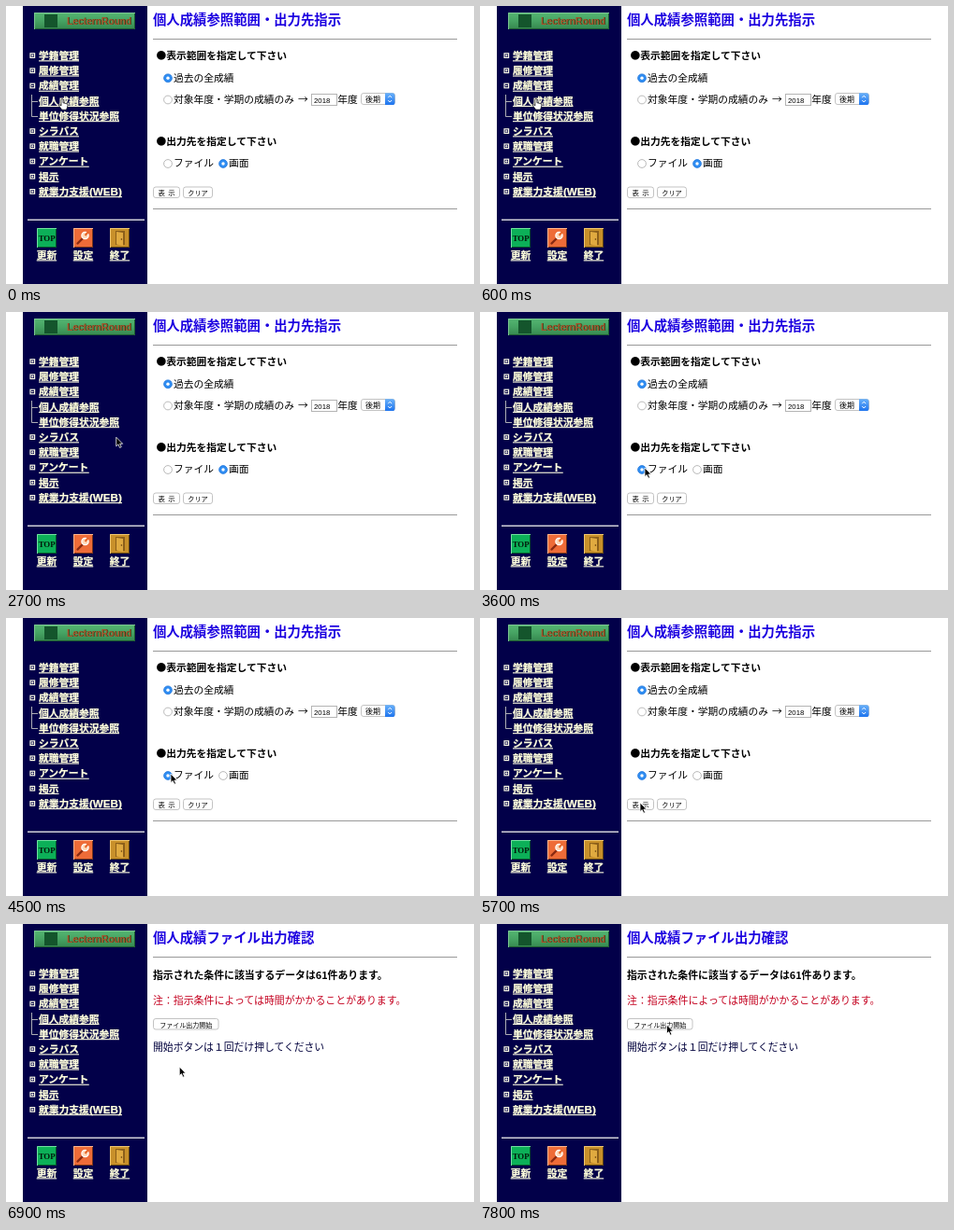
An HTML page that plays this animation: 500 by 298 pixels, repeating every 8 s.

```html
<!DOCTYPE html>
<html lang="ja">
<head>
<meta charset="utf-8">
<title>成績参照</title>
<style>
html, body { margin: 0; width: 100%; height: 100%; overflow: hidden; background: #fff; }
svg { display: block; width: 500px; height: 298px; }
text { font: 10.75px "Noto Sans CJK JP", "Noto Sans CJK", sans-serif; white-space: pre; }
.title { font-size: 14.36px; font-weight: 700; fill: #1c00e0; }
.bold { font-weight: 700; }
.link { font-weight: 700; fill: #ffffe4; stroke: #ffffc8; stroke-width: .25; }
.latin { font-family: "Liberation Sans", Arial, sans-serif; }
.rule { fill: #999; }
.box { fill: #fff; stroke: #b4b4b4; }
.ring { fill: var(--ring, #fff); stroke: var(--edge, #a9a9a9); }
.dot { fill: #fff; }
.on { --ring: #2f8df2; --edge: #2579dc; }
</style>
</head>
<body>
<svg viewBox="0 0 500 298">
  <defs>
    <linearGradient id="leaf" x2="0" y2="1">
      <stop offset="0" stop-color="#55b672"/>
      <stop offset=".5" stop-color="#46a363"/>
      <stop offset="1" stop-color="#36884f"/>
    </linearGradient>
    <linearGradient id="blue" x2="0" y2="1">
      <stop offset="0" stop-color="#69b1fa"/>
      <stop offset="1" stop-color="#1e74ee"/>
    </linearGradient>
    <g id="radio">
      <circle class="ring" r="4.4" stroke-width=".8"/>
      <circle class="dot" r="1.7"/>
    </g>
  </defs>

  <rect x="18" width="133" height="298" fill="#020049"/>
  <rect x="30" y="7" width="108" height="18" fill="url(#leaf)"/>
  <path d="M30.5 25V7.5H138" fill="none" stroke="#7cc692"/>
  <path d="M31 24.5H137.5V8" fill="none" stroke="#1d5a31"/>
  <rect x="41" y="9" width="14" height="14" fill="#14552c"/>
  <text class="latin" x="65.8" y="20.3" style="font-size:10.2px;font-weight:700" fill="#274a20">LecternRound</text>
  <text class="latin" x="65" y="19.5" style="font-size:10.2px;font-weight:700" fill="#a5532b">LecternRound</text>
  <g id="menu"></g>
  <path d="M27.5 95V118.5H34M27.5 102.5H34" fill="none" stroke="#d8d8d0" stroke-width=".8"/>

  <rect x="23" y="228.5" width="125" height="1.5" fill="#d0d0d8"/>
  <g id="tiles"></g>
  <text x="43.6" y="251.8" text-anchor="middle" style="font:700 8.8px 'Liberation Serif',serif" fill="#02180a">TOP</text>
  <path d="M76.5 254.5L82 249" stroke="#8a2a12" stroke-width="2.4" stroke-linecap="round"/>
  <circle cx="84.5" cy="246" r="3.6" fill="#ffd9b8" stroke="#fff" stroke-width="1.3"/>
  <path d="M84.5 246L88 242" stroke="#e8682c" stroke-width="2"/>
  <path d="M117 241H127V256H117Z" fill="#8c5f1a"/>
  <path d="M118 242L125 243V257L118 255.5Z" fill="#e0aa40"/>
  <circle cx="123.4" cy="250" r=".8" fill="#5a3508"/>

  <rect class="rule" x="157" y="35" width="325" height="1"/>

  <g id="form">
    <text class="title" x="157" y="20">個人成績参照範囲・出力先指示</text>
    <text class="bold" x="160.5" y="57">●表示範囲を指定して下さい</text>
    <use class="on" href="#radio" x="173" y="77.3"/>
    <text x="179" y="80.5">過去の全成績</text>
    <use href="#radio" x="173" y="100.5"/>
    <text x="179" y="103.5">対象年度・学期の成績のみ</text>
    <text x="312" y="103.5">→</text>
    <rect class="box" x="326.5" y="94.5" width="27" height="12"/>
    <text class="latin" x="329" y="103.5" style="font-size:7.8px">2018</text>
    <text x="354.3" y="103.5">年度</text>
    <rect class="box" x="379.5" y="93.5" width="36" height="12" rx="2.5" stroke-width=".8"/>
    <path d="M405 93.2h7.8q2.6 0 2.6 2.6v7.6q0 2.6-2.6 2.6h-7.8z" fill="url(#blue)"/>
    <path d="M408.3 98.2l1.9-2 1.9 2M408.3 101l1.9 2 1.9-2" fill="none" stroke="#fff"/>
    <text x="384" y="102.7" style="font-size:8px">後期</text>
    <text class="bold" x="160.5" y="148.7">●出力先を指定して下さい</text>
    <use id="file" href="#radio" x="173" y="169"/>
    <text x="179" y="172">ファイル</text>
    <use id="screen" href="#radio" x="232" y="169"/>
    <text x="238" y="172">画面</text>
    <rect class="box" x="157.5" y="194" width="28" height="11.5" rx="2.5" stroke-width=".8"/>
    <text x="171.5" y="202.6" text-anchor="middle" style="font-size:7.4px">表&#160; 示</text>
    <rect class="box" x="189.5" y="194" width="31" height="11.5" rx="2.5" stroke-width=".8"/>
    <text x="205" y="202.6" text-anchor="middle" style="font-size:7.2px">クリア</text>
    <rect class="rule" x="157" y="217" width="325" height="1"/>
  </g>

  <g id="confirm" visibility="hidden">
    <text class="title" x="157" y="20">個人成績ファイル出力確認</text>
    <text class="bold" x="157" y="59.3" style="font-size:10.87px">指示された条件に該当するデータは61件あります。</text>
    <text x="157" y="86.3" fill="#c4001f" style="font-size:10.92px">注：指示条件によっては時間がかかることがあります。</text>
    <rect class="box" x="157.5" y="101.5" width="69.5" height="11.5" rx="2.5" stroke-width=".8"/>
    <text x="192.2" y="110.6" text-anchor="middle" style="font-size:7px">ファイル出力開始</text>
    <text x="157" y="136.2" fill="#00003c" style="font-size:10.82px">開始ボタンは１回だけ押してください</text>
  </g>

  <g id="cursor">
    <path id="hand" d="M-1-2q1.2-1.2 2 .2v3.6l4 1q1 .4.9 1.5l-.7 3.2-.8 1.7h-4.6l-3.2-4.2q-.2-1.5 1.2-1l1.2.9z" fill="#fff" stroke="#111" stroke-width=".7"/>
    <path id="arrow" d="M0 0V9.6L2.2 7.6 3.8 11.2 5.5 10.4 3.9 7H6.9Z" fill="#000" stroke="#fff" stroke-width=".8"/>
  </g>
</svg>
<script>
const $ = id => document.getElementById(id);
const LOOP = 8000, HOLD = 300;
const link = (x, y, s, w) =>
  `<text class="link" x="${x}" y="${y}">${s}</text>` +
  `<rect x="${x}" y="${y + 1.3}" width="${w}" height="1.1" fill="#ffffe0"/>`;

const items = ['学籍管理', '履修管理', '成績管理', '個人成績参照', '単位修得状況参照',
  'シラバス', '就職管理', 'アンケート', '掲示', '就業力支援'];
$('menu').innerHTML = items.map((s, i) => {
  const y = 53 + i * 16.2, last = i === 9;
  const child = i === 3 || i === 4;
  const mark = child ? '' :
    `<rect x="26" y="${y - 2.2}" width="4.6" height="4.6" fill="#020049" stroke="#fbfbe6" stroke-width="1.2"/>` +
    `<path d="M27 ${y + .1}h2.6${i === 2 ? '' : 'm-1.3-1.3v2.6'}" stroke="#fbfbe6" stroke-width=".9"/>`;
  const tail = last ? `<text class="link latin" x="89" y="${y + 4}" style="font-size:11.6px">(WEB)</text>` : '';
  return mark + link(35, y + 4, s, last ? 89 : s.length * 10.75) + tail;
}).join('');

const tiles = [['更新', '#0cb058', '#72dfa0'], ['設定', '#ee6c38', '#ffb58d'], ['終了', '#c8902a', '#efc56e']];
$('tiles').innerHTML = tiles.map(([s, fill, edge], i) => {
  const x = 33 + i * 39;
  return `<rect x="${x}" y="238" width="21" height="21" fill="${fill}"/>` +
    `<path d="M${x + .5} 259V238.5H${x + 21}" fill="none" stroke="${edge}"/>` +
    `<path d="M${x + 1} 258.5H${x + 20.5}V239" fill="none" stroke="#0008"/>` +
    link(x - .3, 271, s, 21.5);
}).join('');

// Cursor stops: time, x, y
const stops = [[0, 60, 102], [2100, 59.5, 101.5], [3300, 176, 167], [4500, 176, 167],
  [5400, 171, 198], [6300, 171, 198], [7500, 199.5, 108], [8000, 199.5, 108]];
const ease = p => p * p * (3 - 2 * p);

function cursorAt(t) {
  const i = stops.findIndex(s => s[0] > t);
  const [t0, x0, y0] = stops[i - 1], [t1, x1, y1] = stops[i];
  const p = ease((t - t0) / (t1 - t0));
  return [x0 + (x1 - x0) * p, y0 + (y1 - y0) * p];
}

const show = (id, on) => $(id).setAttribute('visibility', on ? 'visible' : 'hidden');

function draw(now) {
  const t = Math.floor(now % LOOP / HOLD) * HOLD;
  const [x, y] = cursorAt(t);
  const overLink = t <= 2100;
  $('cursor').setAttribute('transform', `translate(${x} ${y})`);
  show('hand', overLink);
  show('arrow', !overLink);
  const picked = t >= 3600;
  $('file').classList.toggle('on', picked);
  $('screen').classList.toggle('on', !picked);
  show('form', t < 6000);
  show('confirm', t >= 6000);
}

const start = performance.now();
function tick() {
  draw(performance.now() - start);
  requestAnimationFrame(tick);
}
tick();
</script>
</body>
</html>
```
